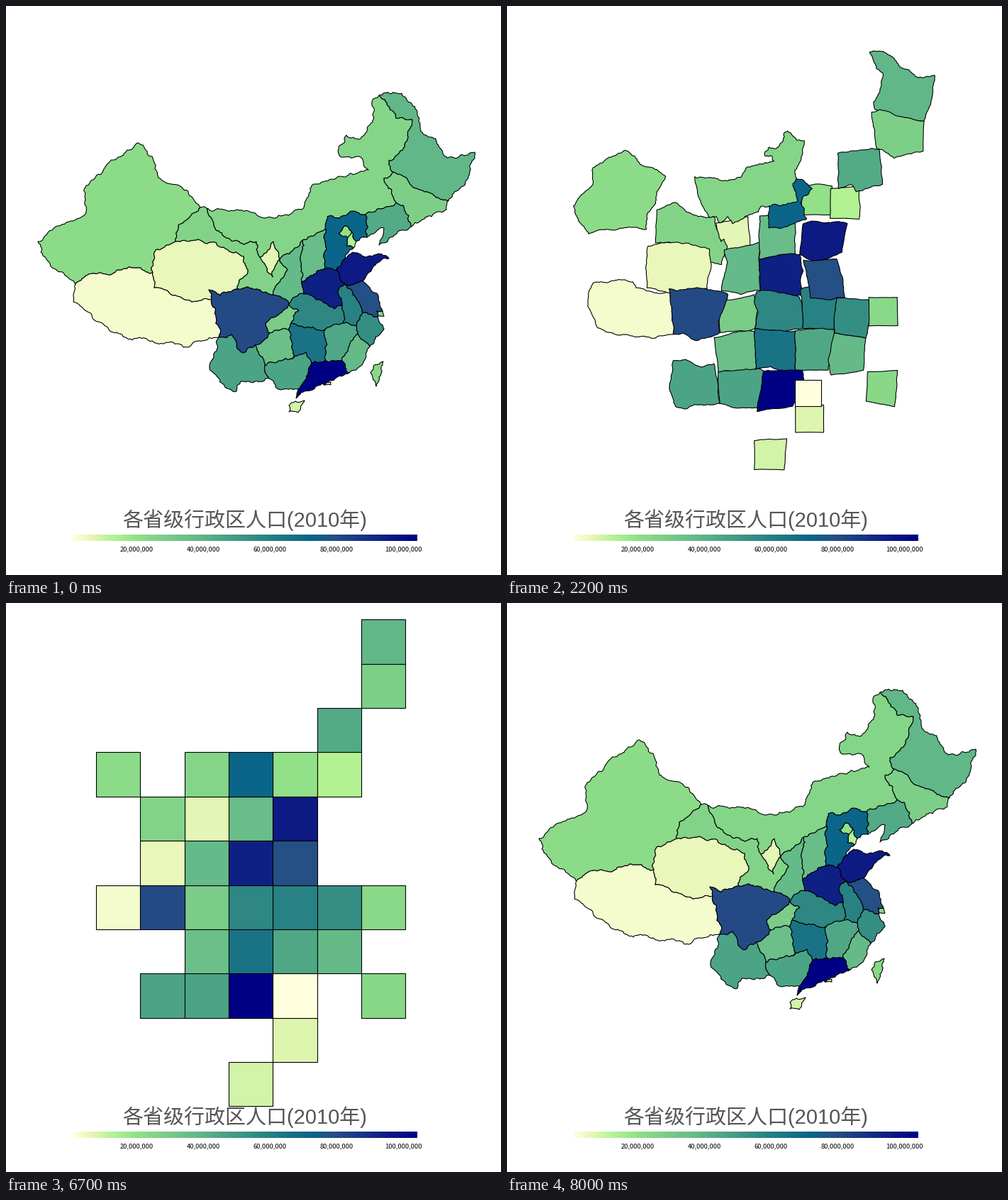
Animation of 698x802 px, one loop 8.6 s. Source, as a matplotlib script:

```python
import random

import matplotlib.pyplot as plt
import numpy as np
from matplotlib.animation import FuncAnimation
from matplotlib.colors import LinearSegmentedColormap
from matplotlib.patches import Polygon

W, H, DPI = 698, 802, 64
PX = 72 / DPI                     # points per pixel
STEP, LOOP = 100, 8600            # ms
TO_TILES, TO_MAP, MORPH = 1800, 6747, 750
LABELS_ON, LABELS_OFF = 2700, 6700
CELL, LEFT, TOP = 62.35, 127, 23.4
LOW, HIGH = 0.55, 104.3           # population range, millions

STOPS = [(LOW, "#ffffe0"), (6, "#e6f6b6"), (13, "#b0f291"), (20, "#90df88"),
         (38, "#62b888"), (60, "#268082"), (72, "#0a6589"), (79, "#264f85"),
         (HIGH, "#000084")]


def scale(pop):
    return (pop - LOW) / (HIGH - LOW)


cmap = LinearSegmentedColormap.from_list(
    "population", [(scale(v), c) for v, c in STOPS], N=512)

fig = plt.figure(figsize=(W / DPI, H / DPI), dpi=DPI, facecolor="white")
ax = fig.add_axes([0, 0, 1, 1])
regions, labels = [], []


def rough(a, b):
    """Ragged border from a to b (b left out), equal for both neighbours."""
    first, last = sorted((a, b))
    rng = random.Random(f"{first}{last}")

    def split(p, q):
        dx, dy = q[0] - p[0], q[1] - p[1]
        size = np.hypot(dx, dy)
        if size < 4:
            return [p]
        k = rng.uniform(-1, 1) * min(0.2, 2.8 / size)
        m = ((p[0] + q[0]) / 2 - k * dy, (p[1] + q[1]) / 2 + k * dx)
        return split(p, m) + split(m, q)

    line = split(first, last) + [last]
    return (line if a == first else line[::-1])[:-1]


def region(name, col, row, pop, *sides):
    """Key points of four sides, clockwise, each starting at its corner."""
    sides = [list(zip(s[::2], s[1::2])) for s in sides]
    x, y = LEFT + col * CELL, TOP + row * CELL
    box = np.array([(x, y), (x + CELL, y), (x + CELL, y + CELL), (x, y + CELL)])
    land, tile = [], []
    for i, side in enumerate(sides):
        j = (i + 1) % 4
        stops = side + sides[j][:1]
        line = [p for a, b in zip(stops, stops[1:]) for p in rough(a, b)]
        line = np.array(line + stops[-1:])
        run = np.cumsum(np.hypot(*np.diff(line, axis=0).T))
        u = np.concatenate([[0], run[:-1]]) / run[-1]
        land.append(line[:-1])
        tile.append(box[i] + u[:, None] * (box[j] - box[i]))
    land, tile = np.vstack(land), np.vstack(tile)
    patch = Polygon(land, closed=True, facecolor=cmap(scale(pop)), edgecolor="black",
                    linewidth=1.1 * PX, joinstyle="round", zorder=2)
    ax.add_patch(patch)
    regions.append((patch, land, tile))
    labels.append(ax.text(x, y + 18.6, name, size=14.6 * PX, color="black",
                          family="Noto Sans CJK JP", zorder=3))


# Painted in this order, west to east and then south
region("新疆", 0, 3, 21.8,
       [113, 253, 142, 224, 171, 203, 187, 193, 206, 212, 219, 245, 246, 254],
       [274, 284, 243, 309, 239, 332, 213, 343], [207, 376, 190, 369, 113, 380],
       [98, 392, 52, 352, 45, 332, 65, 316, 112, 293])
region("西藏", 0, 6, 3.0,
       [113, 380, 190, 369, 207, 376, 209, 397, 262, 417], [290, 413],
       [300, 467, 250, 481, 200, 471, 165, 466], [130, 445, 95, 417, 98, 392])
region("宁夏", 2, 4, 6.3, [358, 354], [377, 332], [386, 357], [376, 382, 366, 366])
region("甘肃", 1, 4, 25.6,
       [243, 309, 274, 284, 283, 285, 300, 317, 335, 336],
       [353, 332, 358, 354, 366, 366, 376, 382, 386, 357, 397, 372],
       [377, 407, 347, 398, 327, 399, 341, 372, 335, 353, 290, 333], [239, 332])
region("青海", 1, 5, 5.6, [213, 343, 239, 332, 290, 333], [335, 353, 341, 372],
       [327, 399, 302, 408, 286, 400, 290, 413, 262, 417], [209, 397, 207, 376])
region("重庆", 2, 6, 28.8, [366, 447], [399, 420, 413, 429],
       [402, 447, 399, 457], [372, 461])
region("四川", 1, 6, 80.4,
       [286, 400, 302, 408, 327, 399, 347, 398, 377, 407], [399, 420, 366, 447],
       [372, 461, 351, 478, 334, 489, 318, 463], [300, 467, 290, 413])
region("云南", 1, 8, 46.0, [300, 467, 318, 463, 334, 489], [351, 478, 365, 507],
       [371, 525, 331, 529, 325, 543], [308, 535, 287, 511, 297, 486])
region("广西", 2, 8, 46.0, [365, 507, 404, 497, 423, 488], [431, 503, 426, 519],
       [412, 540, 384, 540], [371, 525])
region("贵州", 2, 7, 34.7, [351, 478, 372, 461], [399, 457], [404, 497], [365, 507])
region("陕西", 2, 5, 37.3, [386, 357], [418, 330, 417, 389],
       [421, 406, 408, 410, 399, 420], [377, 407, 397, 372])
region("山西", 3, 4, 35.7, [418, 330], [451, 315], [449, 371], [417, 389])
region("北京", 4, 3, 19.6, [469, 320, 477, 310], [487, 317], [482, 326], [474, 327])
region("天津", 5, 3, 12.9, [482, 326], [487, 317, 494, 332], [490, 341], [480, 338])
region("河北", 3, 3, 71.9, [453, 297, 470, 299, 488, 289, 507, 294],
       [509, 326, 494, 332, 487, 317, 477, 310, 469, 320, 482, 326, 480, 338],
       [490, 341, 477, 357, 466, 372], [449, 371, 451, 315])
region("内蒙古", 2, 3, 24.7,
       [283, 285, 325, 287, 365, 299, 417, 287, 431, 253, 477, 241, 511, 231,
        497, 212, 470, 211, 480, 182, 500, 187, 518, 160, 516, 135, 526, 126,
        550, 158],
       [573, 160, 561, 200, 540, 218, 546, 234, 533, 243],
       [550, 277, 507, 294, 488, 289, 470, 299, 453, 297, 451, 315, 418, 330,
        386, 357, 377, 332, 358, 354, 353, 332],
       [335, 336, 300, 317])
region("黑龙江", 6, 0, 38.3,
       [526, 126, 558, 123, 580, 150, 588, 180, 606, 187, 622, 214],
       [661, 206, 650, 245], [624, 274, 590, 262],
       [546, 234, 540, 218, 561, 200, 573, 160, 550, 158])
region("吉林", 6, 1, 27.5, [533, 243, 546, 234, 590, 262], [624, 274],
       [621, 287, 600, 297, 571, 311, 560, 281], [550, 277])
region("辽宁", 5, 2, 43.7, [507, 294, 550, 277], [560, 281],
       [571, 311, 526, 337, 533, 313], [509, 326])
region("山东", 4, 4, 95.8, [477, 357, 489, 347, 507, 354, 525, 349], [540, 356],
       [521, 365, 503, 388, 478, 392], [466, 372])
region("河南", 3, 5, 94.0, [417, 389, 449, 371], [466, 372, 478, 392, 468, 403],
       [474, 422, 463, 427], [421, 406])
region("安徽", 4, 6, 59.5, [468, 403, 478, 392, 494, 412], [503, 432],
       [494, 451], [475, 447, 474, 422])
region("江苏", 4, 5, 78.7, [478, 392], [503, 388, 523, 405],
       [531, 430, 523, 430, 524, 438], [503, 432, 494, 412])
region("湖北", 3, 6, 57.2, [408, 410, 421, 406], [463, 427, 474, 422],
       [475, 447, 451, 455], [402, 447, 413, 429, 399, 420])
region("湖南", 3, 7, 65.7, [402, 447], [451, 455], [451, 500, 431, 503, 423, 488],
       [404, 497, 399, 457])
region("江西", 4, 7, 44.6, [451, 455, 475, 447], [494, 451, 496, 462],
       [474, 500], [451, 500])
region("浙江", 5, 6, 54.4, [503, 432], [524, 438, 533, 455], [513, 480],
       [496, 462, 494, 451])
region("福建", 5, 7, 36.9, [496, 462], [513, 480], [505, 500], [484, 517, 474, 500])
region("上海", 6, 6, 23.0, [523, 430], [531, 430], [533, 437], [524, 438])
region("广东", 3, 8, 104.3, [431, 503, 451, 500], [474, 500, 484, 517],
       [440, 535, 416, 545], [409, 553, 412, 540, 426, 519])
region("香港", 4, 9, 7.1, [451, 531], [458, 530], [458, 534], [451, 534])
region("澳门", 4, 8, LOW, [448, 533], [449, 533], [449, 534], [448, 534])
region("海南", 3, 10, 8.7, [399, 563, 408, 557], [421, 556], [412, 573], [399, 572])
region("台湾", 6, 8, 23.2, [519, 506], [532, 501], [522, 536], [514, 517])

# Legend
ax.imshow(np.linspace(0, 1, 486)[None, :], cmap=cmap, aspect="auto",
          extent=(94, 580, 754, 745), interpolation="nearest")
ax.text(337, 734.4, "各省级行政区人口(2010年)", size=29 * PX, color="#555555",
        ha="center", family=["Liberation Sans", "Noto Sans CJK JP"])
for n in range(20, 101, 20):
    ax.text(90.5 + 4.7 * n, 768.7, f"{n * 10**6:,}", size=9.4 * PX, ha="center",
            color="black", family="Noto Sans CJK JP")

ax.set_xlim(0, W)
ax.set_ylim(H, 0)
ax.axis("off")


def ease(u):
    u = min(max(u, 0), 1)
    return 4 * u**3 if u < 0.5 else 1 - 4 * (1 - u)**3


def update(i):
    t = i * STEP
    p = ease((t - TO_TILES) / MORPH) - ease((t - TO_MAP) / MORPH)
    for patch, land, tile in regions:
        patch.set_xy(land + (tile - land) * p)
    for label in labels:
        label.set_visible(LABELS_ON <= t < LABELS_OFF)
    return []


anim = FuncAnimation(fig, update, frames=LOOP // STEP, interval=STEP,
                     repeat=True, repeat_delay=0, blit=False)
plt.show()
```
